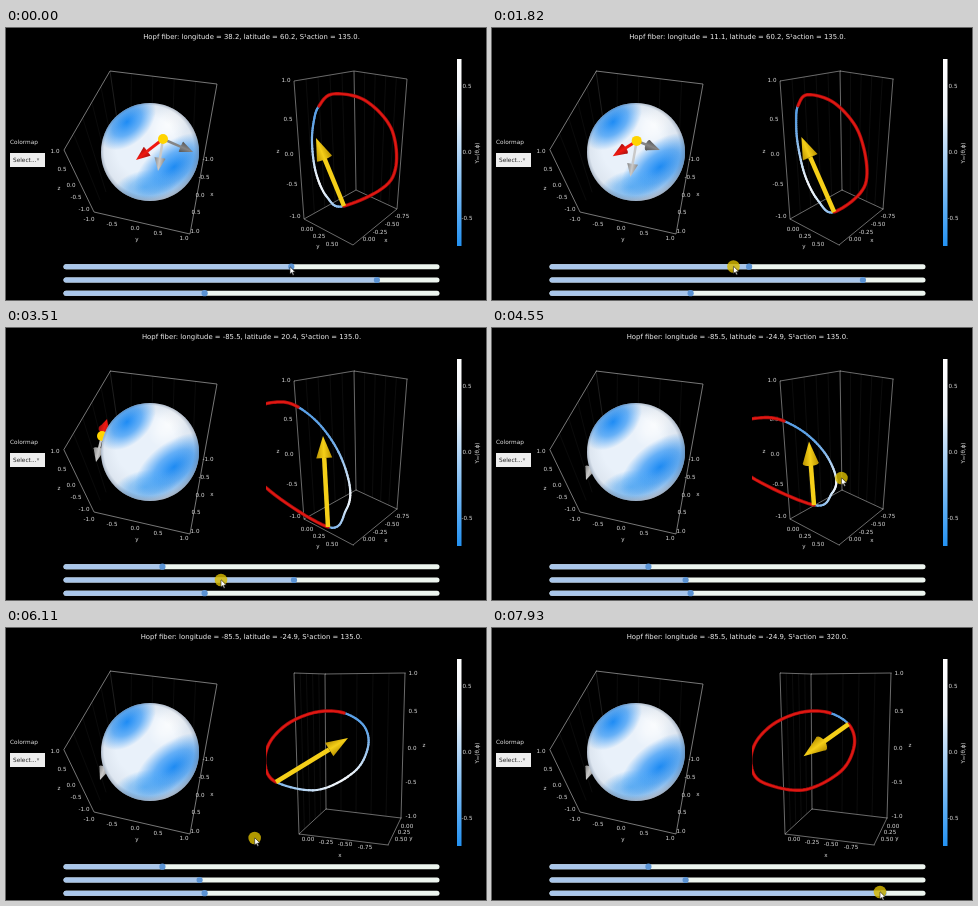
An HTML page with a canvas for the animation above (8000 ms loop, 480x272 px).

```html
<!DOCTYPE html>
<html lang="en">
<head>
<meta charset="utf-8">
<title>Hopf fiber</title>
<style>
  html, body { margin: 0; width: 100%; height: 100%; overflow: hidden; background: #000; }
  canvas { display: block; width: 480px; height: 272px; }
</style>
</head>
<body>
<canvas id="stage"></canvas>
<script>
const canvas = document.getElementById('stage');
const ctx = canvas.getContext('2d');
const ratio = window.devicePixelRatio || 1;
canvas.width = 480 * ratio;
canvas.height = 272 * ratio;

const LOOP = 8000, STEP = 130;
const FONT = '"DejaVu Sans", sans-serif';
const points = text => text.split(' ').map(pair => pair.split(',').map(Number));
const lerp = (a, b, k) => a + (b - a) * k;
const mix = (p, q, k) => p.map((a, i) => a.map((v, j) => lerp(v, q[i][j], k)));
const clamp = v => Math.max(0, Math.min(1, v));
const smooth = v => { const k = clamp(v); return k * k * (3 - 2 * k); };

// Linear keyframes: [time, value, value, ...]
function track(keys, t) {
  let i = 0;
  while (i < keys.length - 2 && t > keys[i + 1][0]) i++;
  const [a, b] = [keys[i], keys[i + 1]];
  const k = clamp((t - a[0]) / (b[0] - a[0]));
  return a.slice(1).map((v, j) => lerp(v, b[j + 1], k));
}

// Trigonometric interpolation through three poses at given angles
function turn(angles, poses, angle) {
  const half = d => Math.sin(d * Math.PI / 360);
  const weights = angles.map((a, i) => angles.reduce((w, b, j) =>
    i === j ? w : w * half(angle - b) / half(a - b), 1));
  return poses[0].map((p, n) => p.map((_, c) =>
    weights.reduce((sum, w, i) => sum + w * poses[i][n][c], 0)));
}

const LONGITUDE = [[260, 38.2], [1130, 140], [1300, 140], [2210, -85.5]];
const LATITUDE = [[2860, 60.2], [3510, 20.4], [4100, -24.9]];
const ACTION = [[6560, 135], [7020, 196], [7930, 320]];
const CURSOR = [[260, 284, 239], [1040, 396, 235], [1250, 396, 236], [2150, 152, 240],
  [2600, 372, 252], [2730, 386, 252], [2860, 371, 252], [3510, 215, 252], [3800, 194, 253],
  [4500, 350, 150], [4680, 348, 150], [5200, 320, 179], [5590, 350, 100],
  [6370, 198, 265], [6500, 198, 266], [7020, 268, 267], [7930, 388, 264]];

// Fiber poses: ten curve points, then the arrow tip
const LON_KEYS = [38.2, 140, -85.5];
const FIBER_HIGH = [
  '313,78 327,66 360,73 387,105 385,152 338,178 321,169 310,145 306,115 308,92 310,110',
  '332,74 332,58 325,60 312,95 302,148 303,180 309,165 317,138 324,112 330,90 320,111',
  '304,73 289,61 264,72 243,105 262,165 321,203 330,180 329,150 322,116 314,92 317,107'
].map(points);
const FIBER_MID = points(
  '292,79 272,74 248,82 236,112 255,155 322,199 340,182 344,160 334,127 315,98 317,108');
const FIBER_LOW = FIBER_MID.map(([x, y]) => [x, 126 + (y - 126) * 0.7]);
const FIBER_SIDE = points(
  '338,85 311,84 283,95 264,114 259,136 270,154 311,162 348,144 362,119 358,98 342,110');
const ARROW_KEYS = [135, 196, 320];
const ARROW_SIDE = ['72,-44', '0,-50', '-45,32'].map(points);

// Sphere marker: dot, then the tips of the dark, light and red arrows
const MARK_HIGH = [
  '157,111 187,124 152,143 130,132',
  '165,82 193,95 163,89 184,98',
  '117,91 119,89 110,114 145,86'
].map(points);
const MARK_MID = points('96,108 110,105 90,134 101,91');
const MARK_LOW = points('104,125 120,130 94,152 105,113');

const BOX_A = points('288,53 348,43 401,51 298,191 350,162 391,181 347,217');
const BOX_B = points('288,45 319,46 399,45 293,206 320,181 395,190 382,217');
const BOX_EDGES = points('0,1 1,2 0,3 1,4 2,5 3,4 4,5 3,6 6,5');

function text(str, x, y, size = 5.6, align = 'center', color = '#ddd') {
  ctx.font = `${size}px ${FONT}`;
  ctx.textAlign = align;
  ctx.textBaseline = 'middle';
  ctx.fillStyle = color;
  ctx.fillText(str, x, y);
}

function labels(names, places) {
  const at = points(places);
  names.split(' ').forEach((name, i) => text(name, ...at[i]));
}

function path(pts, color, width, close) {
  ctx.beginPath();
  pts.forEach(p => ctx.lineTo(...p));
  if (close) ctx.closePath();
  ctx.strokeStyle = color;
  ctx.lineWidth = width;
  ctx.stroke();
}

function disc(x, y, r, color) {
  ctx.fillStyle = color;
  ctx.beginPath();
  ctx.arc(x, y, r, 0, 7);
  ctx.fill();
}

function arrow([x, y], [tx, ty], full, shaft, head, radius, light, dark) {
  const len = Math.hypot(tx - x, ty - y);
  const tall = Math.min(head, len * 0.6);
  ctx.save();
  ctx.translate(x, y);
  ctx.rotate(Math.atan2(ty - y, tx - x));
  const shade = ctx.createLinearGradient(0, -radius, 0, radius);
  shade.addColorStop(0, dark);
  shade.addColorStop(0.5, light);
  shade.addColorStop(1, dark);
  ctx.fillStyle = light;
  ctx.fillRect(0, -shaft / 2, len - tall, shaft);
  ctx.fillStyle = shade;
  ctx.beginPath();
  ctx.moveTo(len, 0);
  ctx.lineTo(len - tall, radius);
  ctx.lineTo(len - tall, -radius);
  ctx.fill();
  const flat = radius * clamp(0.15 + 1.4 * (0.95 - len / full));
  ctx.beginPath();
  ctx.ellipse(len - tall, 0, flat, radius, 0, 0, 7);
  ctx.fill();
  ctx.restore();
}

function blob(x, y, rx, ry, angle, rgb, alpha) {
  ctx.save();
  ctx.translate(x, y);
  ctx.rotate(angle);
  ctx.scale(rx, ry);
  const g = ctx.createRadialGradient(0, 0, 0, 0, 0, 1);
  g.addColorStop(0, `rgba(${rgb},${alpha})`);
  g.addColorStop(0.5, `rgba(${rgb},${alpha * 0.65})`);
  g.addColorStop(1, `rgba(${rgb},0)`);
  ctx.fillStyle = g;
  ctx.fillRect(-1, -1, 2, 2);
  ctx.restore();
}

function sphere() {
  ctx.save();
  ctx.beginPath();
  ctx.arc(144, 124, 49, 0, 7);
  ctx.clip();
  ctx.fillStyle = '#e9f1fa';
  ctx.fillRect(94, 74, 100, 100);
  blob(121, 94, 34, 22, -0.75, '30,140,245', 1);
  blob(168, 139, 46, 25, -0.65, '30,140,245', 1);
  blob(139, 159, 32, 17, -0.2, '70,165,248', 0.75);
  blob(163, 96, 26, 18, -0.9, '255,255,255', 0.8);
  const rim = ctx.createRadialGradient(140, 118, 30, 144, 124, 50);
  rim.addColorStop(0, 'rgba(40,60,90,0)');
  rim.addColorStop(0.75, 'rgba(40,60,90,0.06)');
  rim.addColorStop(1, 'rgba(40,60,90,0.38)');
  ctx.fillStyle = rim;
  ctx.fillRect(94, 74, 100, 100);
  ctx.restore();
}

function marker(lon, lat) {
  const high = turn(LON_KEYS, MARK_HIGH, lon);
  const [dot, dark, light, red] = lat > 20.4
    ? mix(MARK_MID, high, (lat - 20.4) / 39.8)
    : mix(MARK_LOW, MARK_MID, (lat + 24.9) / 45.3);
  const drawDot = () => disc(...dot, 5, '#ffd400');
  if (lon > 100) drawDot();
  arrow(dot, dark, 33, 2.5, 13, 5.5, '#858585', '#555');
  arrow(dot, light, 32, 2.5, 13, 5.5, '#c9c9c9', '#858585');
  arrow(dot, red, 34, 3, 14, 5.5, '#f01810', '#a51010');
  if (lon <= 100) drawDot();
}

function leftPlot(lon, lat) {
  for (let i = 1; i < 5; i++) {
    const x = 104 + i * 21.4, y = 43 + i * 2.6;
    path([[x, y], [x - i, y + 98]], '#181818', 0.5);
    path([[104 - i * 9, 43 + i * 16], [118 - i * 6, 140 + i * 8]], '#161616', 0.5);
  }
  path([[104, 43], [118, 140]], '#333', 0.6);
  path(points('104,43 211,56 184,206 88,184 58,122'), '#aaa', 0.7, true);
  labels('1.0 0.5 0.0 -0.5 -1.0 z', '49,124 56,142 65,158 70,170 78,182 53,161');
  labels('-1.0 -0.5 0.0 0.5 1.0 y', '83,192 106,197 129,201 152,206 178,211 131,212');
  labels('-1.0 -0.5 0.0 0.5 1.0 x', '202,132 198,150 194,168 190,185 189,204 206,167');
  if (lat < 30) marker(lon, lat);
  sphere();
  if (lat >= 30) marker(lon, lat);
}

// Closed Catmull-Rom curve
function curveAt(pts, u) {
  const n = pts.length, i = Math.floor(u), k = u - i;
  const [a, b, c, d] = [-1, 0, 1, 2].map(o => pts[(i + o + n) % n]);
  return [0, 1].map(j => b[j] + 0.5 * k * (c[j] - a[j] + k *
    (2 * a[j] - 5 * b[j] + 4 * c[j] - d[j] + k * (3 * (b[j] - c[j]) + d[j] - a[j]))));
}

function rightAxes(view) {
  const box = mix(BOX_A, BOX_B, view);
  const along = (a, b, k) => mix([box[a]], [box[b]], k)[0];
  for (let k = 0.2; k < 1; k += 0.2) {
    path([along(0, 1, k), along(3, 4, k)], '#1b1b1b', 0.5);
    path([along(1, 2, k), along(4, 5, k)], '#1b1b1b', 0.5);
  }
  BOX_EDGES.forEach(([a, b]) => path([box[a], box[b]], '#999', 0.7));
  if (view < 0.5) {
    labels('1.0 0.5 0.0 -0.5 -1.0 z', '280,53 282,92 283,127 286,157 289,189 272,124');
    labels('0.00 0.25 0.50 y', '301,202 313,209 326,217 312,219');
    labels('0.00 -0.25 -0.50 -0.75 x', '363,212 374,205 386,197 396,189 380,213');
  } else {
    labels('1.0 0.5 0.0 -0.5 -1.0 z', '407,46 407,84 406,121 405,155 405,189 418,118');
    labels('0.00 0.25 0.50 y', '401,199 398,205 395,212 405,211');
    labels('0.00 -0.25 -0.50 -0.75 x', '302,212 320,215 339,217 359,220 334,228');
  }
}

function rightPlot(lon, lat, action, view) {
  ctx.save();
  ctx.beginPath();
  ctx.rect(260, 20, 180, 212);
  ctx.clip();
  rightAxes(view);

  const front = lat > 20.4
    ? mix(FIBER_MID, turn(LON_KEYS, FIBER_HIGH, lon), (lat - 20.4) / 39.8)
    : mix(FIBER_LOW, FIBER_MID, (lat + 24.9) / 45.3);
  const pose = mix(front, FIBER_SIDE, view);
  const ring = pose.slice(0, 10);
  const end = action < 135 ? action / 27 : 5 + (action - 135) / 45;

  ctx.lineCap = 'round';
  for (let u = end; u < 10; u += 0.1) {
    const white = Math.exp(-(((u - 6.6) / 1.3) ** 2));
    const color = `rgb(${lerp(90, 240, white)},${lerp(160, 245, white)},${lerp(230, 250, white)})`;
    path([curveAt(ring, u), curveAt(ring, Math.min(u + 0.1, 9.999))], color, 2.2);
  }
  const trace = [];
  for (let u = 0; u < end; u += 0.08) trace.push(curveAt(ring, u));
  const base = curveAt(ring, end);
  trace.push(base);
  path(trace, '#a80c0c', 3.4);
  path(trace, '#e01812', 1.9);

  const [side] = turn(ARROW_KEYS, ARROW_SIDE, action);
  const vec = [0, 1].map(j => lerp(pose[10][j] - base[j], side[j], view));
  arrow(base, [base[0] + vec[0], base[1] + vec[1]], 78, 4.5, 22, 8, '#f5cf18', '#b99200');
  ctx.restore();
}

function colorbar() {
  const g = ctx.createLinearGradient(0, 31, 0, 217);
  g.addColorStop(0, '#fff');
  g.addColorStop(0.3, '#eef3f9');
  g.addColorStop(1, '#2492f2');
  ctx.fillStyle = g;
  ctx.fillRect(451, 31, 4.5, 187);
  labels('0.5 0.0 -0.5', '461,59 461,125 461,191');
  ctx.save();
  ctx.translate(472, 125);
  ctx.rotate(-Math.PI / 2);
  text('Yₗₘ(θ,ϕ)', 0, 0, 5.6);
  ctx.restore();
}

function slider(y, k) {
  const x = 58 + 375 * k;
  ctx.lineCap = 'round';
  path([[60, y], [431, y]], '#edf5ef', 5);
  path([[60, y], [x, y]], '#a9c6ea', 5);
  disc(x, y, 3.1, '#5b93d3');
}

function cursor(x, y, halo) {
  if (halo) disc(x, y, 6.3, 'rgba(215,185,0,0.82)');
  ctx.save();
  ctx.translate(x, y);
  ctx.beginPath();
  points('0,0 0,7 1.7,5.5 2.9,8.2 4,7.7 2.8,5.1 5,5').forEach(p => ctx.lineTo(...p));
  ctx.closePath();
  ctx.fillStyle = '#fff';
  ctx.strokeStyle = '#222';
  ctx.lineWidth = 0.6;
  ctx.fill();
  ctx.stroke();
  ctx.restore();
}

function draw(t) {
  const [lon] = track(LONGITUDE, t);
  const [lat] = track(LATITUDE, t);
  const [action] = track(ACTION, t);
  const view = smooth((t - 4600) / 560);

  ctx.setTransform(ratio, 0, 0, ratio, 0, 0);
  ctx.fillStyle = '#000';
  ctx.fillRect(0, 0, 480, 272);
  text(`Hopf fiber: longitude = ${lon.toFixed(1)}, latitude = ${lat.toFixed(1)}, ` +
    `S¹action = ${action.toFixed(1)}.`, 245.5, 9.5, 6.87, 'center', '#eee');
  text('Colormap', 4, 114, 5.8, 'left');
  ctx.fillStyle = '#eee';
  ctx.fillRect(4, 125, 35, 14);
  text('Select...', 7, 132, 5.8, 'left', '#222');
  text('▾', 32, 132, 5, 'center', '#777');

  leftPlot(lon, lat);
  rightPlot(lon, lat, action, view);
  colorbar();
  slider(238.7, (lon + 180) / 360);
  slider(252, (lat + 90) / 180);
  slider(265.2, action / 360);
  cursor(...track(CURSOR, t), t >= 260);
}

let start;
function tick(now) {
  start ??= now;
  draw(Math.floor(((now - start) % LOOP) / STEP) * STEP);
  requestAnimationFrame(tick);
}
requestAnimationFrame(tick);
</script>
</body>
</html>
```
